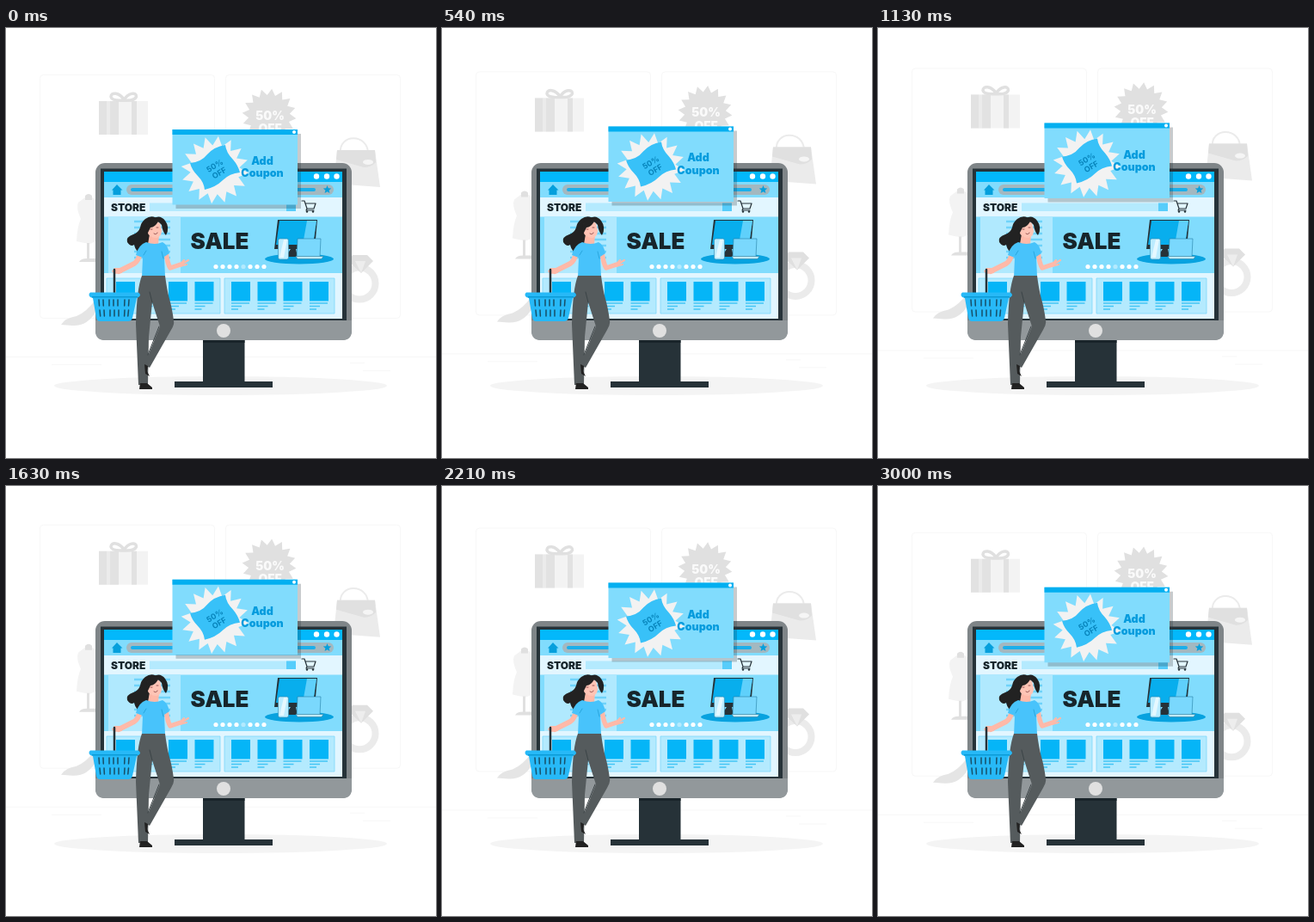
An HTML page that plays this animation: 500 by 500 pixels, repeating every 3.04 s.

```html
<!DOCTYPE html>
<html lang="en">
<head>
<meta charset="utf-8">
<title>Add coupon</title>
<style>
html, body { margin: 0; width: 100%; height: 100%; overflow: hidden; background: #fff; }
svg { display: block; width: 100vw; height: 100vh; }
text { font-family: Inter, "Open Sans", sans-serif; font-weight: 900; text-anchor: middle; }
.line { fill: none; stroke-linecap: round; stroke-linejoin: round; }
</style>
</head>
<body>
<svg viewBox="0 0 500 500">
  <ellipse cx="249.500" cy="416" rx="193.500" ry="11" fill="#f4f4f4"/>

  <g class="float">
    <g fill="none" stroke="#f7f7f7">
      <rect x="39.500" y="54.500" width="203" height="283" rx="4"/>
      <rect x="255.500" y="54.500" width="203" height="283" rx="4"/>
      <path d="M0 382.500H500M53 391.500h58M400 389.500h17M415 398.500h32"/>
    </g>
    <!-- gift -->
    <path fill="#f3f3f3" d="M108 85h57v39h-57z"/>
    <path fill="#e2e2e2" d="M108 85h9v39h-9zM121 85h10v39h-10zM146 85h6v39h-6z"/>
    <path fill="#ebebeb" d="M117 85h4v39h-4z"/>
    <path class="line" stroke="#e0e0e0" stroke-width="3.500" d="M137 83C132 75 122 74 122 80q1 5 15 4C142 75 152 74 151.500 80q-2 5-14.500 4"/>
    <!-- grey badge -->
    <path id="badge" fill="#e0e0e0"/>
    <g fill="#fafafa" font-size="14">
      <text x="307" y="107">50%</text>
      <text x="307" y="122.500">OFF</text>
    </g>
    <!-- handbag -->
    <path class="line" stroke="#ebebeb" stroke-width="2" d="M389 146C386 123 421 122 421 146"/>
    <path fill="#ebebeb" d="M385 142h44l6 43-54-4z"/>
    <path fill="#e0e0e0" d="M385 142h44l1 14q-5 6-14 6l-32-9z"/>
    <ellipse cx="421" cy="156" rx="6" ry="3" fill="#f5f5f5"/>
    <!-- ring -->
    <circle cx="411" cy="297" r="18.500" fill="none" stroke="#ebebeb" stroke-width="8"/>
    <path fill="#e0e0e0" d="M403 264h17l7 7-14 14-15-14z"/>
    <path fill="#ededed" d="M406 271h12l-5 14z"/>
    <!-- dress form -->
    <path fill="#f3f3f3" d="M92 197h8l10 6v42l-12 6q-8-1-16-3 1-18 5-26-6-13-3-19z"/>
    <path fill="#e0e0e0" d="M92 195q4-4 8 0v5h-8zM94 250h3v18h7v4H85q2-4 9-4z"/>
    <!-- shoe -->
    <path fill="#e5e5e5" d="M64 345q5-8 18-10 12-5 22-19l4 30-3-17q-10 18-28 17z"/>
  </g>

  <!-- monitor -->
  <path fill="#263238" d="M229 360h48.500v51H310v7H196v-7h33z"/>
  <path fill="#19242a" d="M229 362h48.500v4H229z"/>
  <rect x="104" y="157" width="298" height="206" rx="11" fill="#7f8588"/>
  <path fill="#92989b" d="M104 340h298v12q0 11-11 11H115q-11 0-11-11z"/>
  <path fill="#263238" d="M110 163.500h286V340H110z"/>
  <circle cx="253" cy="352" r="8" fill="#e0e0e0"/>

  <!-- browser -->
  <path fill="#e2f6ff" d="M114 167h277v171H114z"/>
  <path fill="#03b8fb" d="M114 167h277v12H114z"/>
  <path fill="#81dcfd" d="M114 179h277v18H114z"/>
  <g fill="#fff"><circle cx="361" cy="172.500" r="3.200"/><circle cx="373" cy="172.500" r="3.200"/><circle cx="384.500" cy="172.500" r="3.200"/></g>
  <rect x="140" y="182" width="241" height="12" rx="6" fill="#a3b8c0"/>
  <rect x="145" y="186" width="215" height="4" rx="2" fill="#1bafeb"/>
  <path fill="#059fdc" d="M123 188.500l6-6.500 6.500 6.500h-2v5.500h-9v-5.500z"/>
  <path id="favourite" fill="#059fdc"/>
  <text x="142.300" y="212.500" font-size="12" fill="#17252b">STORE</text>
  <path fill="#b4eafe" d="M167 203.500h170v9.500H167z"/>
  <path fill="#57cdfb" d="M326 203.500h11v9.500h-11z"/>
  <path class="line" stroke="#263238" stroke-width="1.200" d="M344 201h3l3 9h8l2-6h-12M350 210l-1 2h9"/>
  <g fill="#263238"><circle cx="350" cy="213.500" r="1.200"/><circle cx="357" cy="213.500" r="1.200"/></g>

  <path fill="#81dcfd" d="M114 219.500h277V285H114z"/>
  <path fill="#b0e9fe" d="M119 219.500h84V285h-84z"/>
  <path stroke="#6fd3fa" stroke-width="2.500" d="M149 225h42M149 232h42M149 239h42M149 246h42M149 253h42M149 260h42M149 267h42"/>
  <text x="248.500" y="256.500" font-size="26" fill="#17252b">SALE</text>
  <g id="dots"></g>
  <!-- advertised devices -->
  <ellipse cx="341" cy="268.500" rx="40" ry="6" fill="#07a2df"/>
  <path fill="#263238" d="M316 223h46l-3 34h-22l2 9h-14l6-9h-19z"/>
  <path fill="#08aeed" d="M318 224h43l-4 28h-43z"/>
  <path fill="#5fd0fb" d="M350 224h11l-4 28h-12z"/>
  <path fill="#7ad8fd" stroke="#247fa4" stroke-width=".6" d="M339 245h27l-1 21h-27z"/>
  <path fill="#c0eafa" stroke="#37839f" stroke-width=".6" d="M337 265.500h32l-2 3h-28z"/>
  <rect x="316.500" y="245" width="12" height="24" rx="2" fill="#bcecff" stroke="#3189ad" stroke-width=".6"/>
  <path fill="#e5f8ff" d="M323 246h4l-4 21h-5z"/>

  <g fill="#b4eafe" stroke="#74d5fa" stroke-width=".7">
    <path d="M117 291h132v41H117zM254 291h128v41H254z"/>
  </g>
  <g id="goods"></g>

  <!-- coupon window -->
  <g class="float">
    <path fill="#263238" opacity=".25" d="M197.500 123H343v87H197.500z"/>
    <path fill="#81dcfd" d="M193.500 118H339v87.500H193.500z"/>
    <path fill="#03aff0" d="M193.500 118H339v6H193.500z"/>
    <circle cx="335" cy="121" r="2" fill="#fff"/>
    <path id="burst" fill="#f2f2f2"/>
    <path fill="#38c1f8" d="M214 157q13-1 20-10 8-9 21-11 1 9 9 17 6 7 8 15-12 1-20 9-8 8-21 11-1-9-8-16-7-7-9-15z"/>
    <g transform="translate(245.500 164.500) rotate(-31)" fill="#0784bb" font-size="9">
      <text y="-2" style="font-weight:700">50%</text>
      <text y="8" style="font-weight:700">OFF</text>
    </g>
    <g fill="#059bdd" font-size="12.500">
      <text x="298" y="159">Add</text>
      <text x="298" y="173.500">Coupon</text>
    </g>
  </g>

  <!-- shopper -->
  <path fill="#222" d="M178 223q-8-7-16-1-5 4-6 10-2 6-8 8-9 3-7 9 4 6 8 3 2 10 11 11 12 0 13-14z"/>
  <path class="line" stroke="#ffb9a8" stroke-width="6" d="M157 259q-3 12-8 15l-18 9"/>
  <path fill="#ffb9a8" d="M134 279l-8 0-3 4 3 3 9-1z"/>
  <path class="line" stroke="#ffb9a8" stroke-width="5.500" d="M186 261q2 14 5 18l12-4"/>
  <path class="line" stroke="#ffb9a8" stroke-width="2.200" d="M201 276l6-6M202 276l10-6M202 277l8-2"/>
  <path fill="#ffb9a8" d="M167 240h11l-1 12q-5 4-12-1z"/>
  <path fill="#ffc4b5" d="M165 227q7-7 14 0l2 8q0 8-6 9-9 0-11-8z"/>
  <path fill="#222" d="M164 240q-3-14 6-18 9-6 15 2 6 8 1 17-4-4-5-12l-4-4q-4 7-9 7z"/>
  <path class="line" stroke="#803c3d" stroke-width=".8" d="M168 234l2 0M175 232h2M172 239q3 2 4-1"/>
  <path fill="#48c3fb" d="M163 249q10 4 19 0 6 3 8 13l-6 4 1 23q-13 4-27 1l1-23-8-3q3-12 12-15z"/>
  <path class="line" stroke="#239fd6" stroke-width=".8" d="M160 264l3-5M183 268l-2-8"/>
  <path fill="#555b5d" d="M158 288h27q2 16 5 27 3 10 5 25 1 5-3 11l-25 44-6-4 18-44-9-28-4 40-1 56h-11l-3-71q1-41 7-56z"/>
  <path class="line" stroke="#3b4346" stroke-width="1" d="M170 319l-3-12M178 347l-13 33"/>
  <path fill="#222" d="M161 391l4 2-1 6 3 6-5-3zM156 413h8l6 5v2h-15z"/>

  <!-- basket -->
  <path class="line" stroke="#263238" stroke-width="2.500" d="M126 281v28"/>
  <path fill="#27b9f7" d="M98 307.500h56q4 3 0 5.500l-2 1-5 23q-1 4-5 4h-33q-3 0-4-4l-4-23-3-1q-3-3 0-5.500z"/>
  <path fill="#0a9bd7" d="M100 312h53v1.500h-53z"/>
  <path class="line" stroke="#174f68" stroke-width="1.500" d="M108 316l.5 7M113 316l.3 7M120 316v7M125 316v7M130 316v7M138 316l-.3 7M143 316l-.5 7M109 328l.7 7M114 328l.4 7M121 328v7M126 328v7M131 328v7M138 328l-.4 7M142.500 328l-.7 7"/>
</svg>
<script>
const get = id => document.getElementById(id);

function star(id, cx, cy, outer, inner, points, turn) {
  const corners = Array.from({length: points * 2}, (_, i) => {
    const r = i % 2 ? inner : outer, a = turn + i * Math.PI / points;
    return (cx + r * Math.cos(a)).toFixed(2) + ' ' + (cy + r * Math.sin(a)).toFixed(2);
  });
  get(id).setAttribute('d', 'M' + corners.join('L') + 'z');
}
star('badge', 306, 102, 31.5, 24, 16, 0.1);
star('burst', 243, 165, 39.5, 28.5, 16, 0.1);
star('favourite', 373.5, 188, 5, 2.2, 5, -Math.PI / 2);

get('dots').innerHTML = Array.from({length: 8}, (_, i) =>
  `<circle cx="${244 + i * 8}" cy="277.500" r="2.600" fill="${i == 4 ? '#b4eafe' : '#fff'}"/>`).join('');

get('goods').innerHTML = [128, 158.5, 189, 219.5, 262, 292.5, 322.5, 353].map(x =>
  `<path fill="#05b5f7" d="M${x} 295h22v22.500h-22z"/>
   <path stroke="#43c5f5" stroke-width="1.500" d="M${x} 320h21M${x} 323.500h12M${x} 327h8"/>`).join('');

const PERIOD = 3040, RISE = 10;
const floats = document.querySelectorAll('.float');
function draw(now) {
  const t = now % PERIOD / PERIOD;
  const y = -RISE * (1 - Math.abs(1 - 2 * t));
  floats.forEach(g => g.setAttribute('transform', `translate(0 ${y.toFixed(2)})`));
  requestAnimationFrame(draw);
}
draw(performance.now());
</script>
</body>
</html>
```
